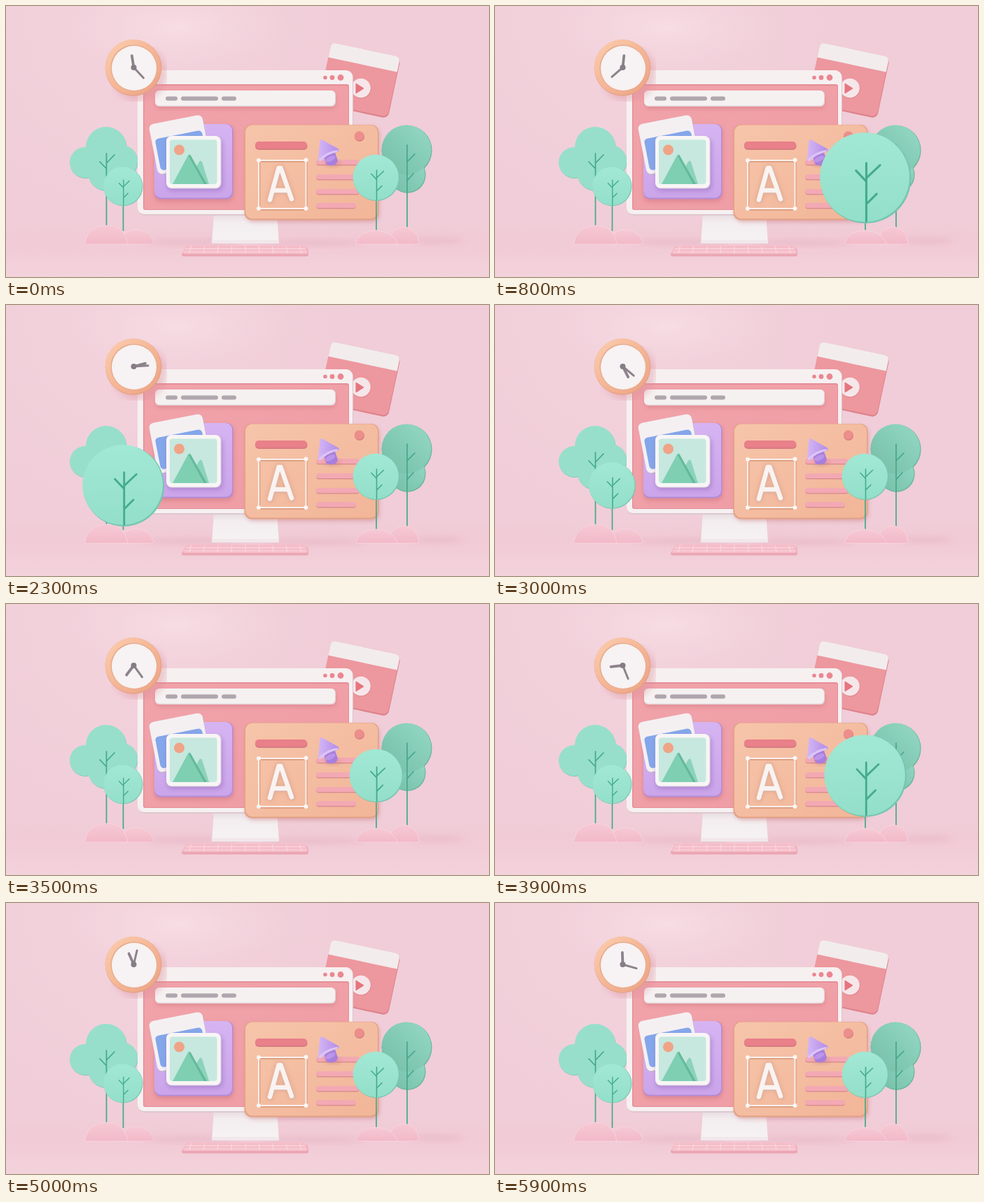
Animation of 690 by 388 pixels, one loop 6000 ms. Source, as an HTML page:

```html
<!DOCTYPE html>
<html lang="en">
<head>
<meta charset="utf-8">
<title>Design desk</title>
<style>
html, body { margin: 0; width: 100%; height: 100%; overflow: hidden; background: #f0cdd8; }
svg { display: block; width: 100vw; height: 100vh; }
</style>
</head>
<body>
<svg viewBox="0 0 690 388" xmlns="http://www.w3.org/2000/svg">
  <defs>
    <radialGradient id="glow" cx="190" cy="20" r="330" gradientUnits="userSpaceOnUse">
      <stop offset="0" stop-color="#f3d3dd"/><stop offset="1" stop-color="#f0cdd8"/>
    </radialGradient>
    <radialGradient id="spot">
      <stop offset="0" stop-color="#f7dde4"/><stop offset="1" stop-color="#f4d6df" stop-opacity="0"/>
    </radialGradient>
    <linearGradient id="floor" x1="0" y1="0" x2="0" y2="1">
      <stop offset="0" stop-color="#f0c9d5" stop-opacity="0"/><stop offset=".4" stop-color="#f1cbd6"/><stop offset="1" stop-color="#f3d2dc"/>
    </linearGradient>
    <linearGradient id="rim" x1="0" y1="0" x2="1" y2="1">
      <stop offset="0" stop-color="#fbceb0"/><stop offset=".5" stop-color="#f5b796"/><stop offset="1" stop-color="#eba184"/>
    </linearGradient>
    <linearGradient id="screen" x1="0" y1="0" x2="1" y2="1">
      <stop offset="0" stop-color="#f1a3aa"/><stop offset="1" stop-color="#ef9ca4"/>
    </linearGradient>
    <linearGradient id="peach" x1="0" y1="0" x2="1" y2="1">
      <stop offset="0" stop-color="#f6c5aa"/><stop offset="1" stop-color="#f2b598"/>
    </linearGradient>
    <linearGradient id="violet" x1="0" y1="0" x2="0" y2="1">
      <stop offset="0" stop-color="#d6b4f2"/><stop offset="1" stop-color="#cba5ea"/>
    </linearGradient>
    <linearGradient id="cone" x1="0" y1="0" x2="1" y2="0">
      <stop offset="0" stop-color="#d3b6f6"/><stop offset="1" stop-color="#b48ce6"/>
    </linearGradient>
    <linearGradient id="leaf" x1="0" y1="0" x2="0" y2="1">
      <stop offset="0" stop-color="#a2e8d5"/><stop offset="1" stop-color="#93dfca"/>
    </linearGradient>
    <linearGradient id="dusk" x1="1" y1="0" x2="0" y2="1">
      <stop offset="0" stop-color="#94d9c5"/><stop offset="1" stop-color="#74bda5"/>
    </linearGradient>
    <linearGradient id="mound" x1="0" y1="0" x2="0" y2="1">
      <stop offset="0" stop-color="#f6c9d5"/><stop offset="1" stop-color="#f2b9c8"/>
    </linearGradient>
    <linearGradient id="stand" x1="0" y1="0" x2="0" y2="1">
      <stop offset="0" stop-color="#e4d8dc"/><stop offset=".3" stop-color="#f3edef"/><stop offset="1" stop-color="#f6f2f3"/>
    </linearGradient>
    <filter id="soft" x="-30%" y="-30%" width="160%" height="160%"><feGaussianBlur stdDeviation="3"/></filter>
    <filter id="haze" x="-30%" y="-200%" width="160%" height="500%"><feGaussianBlur stdDeviation="5"/></filter>
    <g id="crown">
      <circle cx=".6" cy=".5" r="33" fill="#76c6b0"/>
      <circle cx="-.2" cy="-.2" r="32.600" fill="url(#leaf)"/>
      <path d="M1-10.500V32M1 .5L11-9M1 3L-6.500-5M1 19.500L8.500 12" fill="none" stroke="#45ab8e" stroke-linecap="round" stroke-width="1.600"/>
    </g>
  </defs>

  <rect width="690" height="388" fill="url(#glow)"/>
  <ellipse cx="245" cy="30" rx="160" ry="60" fill="url(#spot)"/>
  <rect y="310" width="690" height="78" fill="url(#floor)"/>
  <g fill="#e2aabb" opacity=".55" filter="url(#haze)">
    <ellipse cx="265" cy="338" rx="70" ry="3.500"/>
    <ellipse cx="440" cy="339" rx="75" ry="3.500"/>
    <ellipse cx="615" cy="336" rx="40" ry="3.500"/>
  </g>

  <!-- video card -->
  <g transform="translate(465 52) rotate(12)">
    <rect x=".5" y="1.500" width="101" height="88.500" rx="8" fill="#dd828b"/>
    <rect width="100.500" height="88" rx="8" fill="#ed979e"/>
    <path d="M0 22V8Q0 0 8 0H92.500Q100.500 0 100.500 8V22Z" fill="#f2eced"/>
  </g>
  <circle cx="507.500" cy="118.500" r="14" fill="#d97f87" opacity=".6"/>
  <circle cx="507" cy="117.500" r="13.800" fill="#f6e6e9"/>
  <path d="M500 111L511 118L500 125Z" fill="#e5757e" stroke="#e5757e" stroke-linejoin="round"/>

  <!-- back trees -->
  <g>
    <g fill="#7cc8b3" transform="translate(.6 1)">
      <circle cx="143" cy="202" r="29"/><circle cx="113" cy="224" r="22"/><circle cx="165" cy="222" r="23"/><circle cx="143" cy="238" r="26"/>
    </g>
    <g fill="#97dfcb">
      <circle cx="143" cy="202" r="29"/><circle cx="113" cy="224" r="22"/><circle cx="165" cy="222" r="23"/><circle cx="143" cy="238" r="26"/>
    </g>
    <path d="M143.500 211V318M143.500 225L155 213M143.500 233L134 223" fill="none" stroke="#45a88b" stroke-width="1.700" stroke-linecap="round"/>
  </g>
  <g>
    <g fill="#68b59e" transform="translate(.6 .8)"><circle cx="572" cy="206" r="36"/><circle cx="573" cy="241" r="26"/></g>
    <g fill="url(#dusk)"><circle cx="573" cy="241" r="25.500"/><circle cx="572" cy="206" r="35.500"/></g>
    <path d="M573 199V318M573 223L584 212M573 250L582 240" fill="none" stroke="#45a88b" stroke-width="1.700" stroke-linecap="round"/>
  </g>

  <!-- monitor -->
  <path d="M297 296H387L390 340H294Z" fill="url(#stand)"/>
  <path d="M294 335H390V340H294Z" fill="#f1e8eb"/>
  <rect x="189" y="93" width="307" height="207" rx="9" fill="#ddc8cf"/>
  <rect x="188" y="92" width="307" height="206" rx="9" fill="#f6f0f1"/>
  <rect x="196" y="112" width="294" height="180" rx="3" fill="#e58e97"/>
  <rect x="197.500" y="114" width="291.500" height="177" rx="3" fill="url(#screen)"/>
  <g fill="#ea8790">
    <circle cx="456" cy="102.500" r="2.800"/><circle cx="466" cy="102.500" r="3.400"/><circle cx="478" cy="102.500" r="4.400"/>
  </g>
  <rect x="214" y="125" width="257" height="22" rx="6" fill="#d67d85" opacity=".6" filter="url(#soft)"/>
  <rect x="213" y="121" width="258" height="23" rx="6" fill="#e4d6d9"/>
  <rect x="213" y="121" width="257" height="21.500" rx="6" fill="#f6f1f1"/>
  <g fill="#b0a6ad">
    <rect x="228" y="129.500" width="17" height="6" rx="3"/><rect x="250" y="129.500" width="53" height="6" rx="3"/><rect x="308" y="129.500" width="21" height="6" rx="3"/>
  </g>

  <!-- picture cards -->
  <rect x="212" y="172" width="113" height="108" rx="9" fill="#cf7580" opacity=".6" filter="url(#soft)"/>
  <rect x="212" y="169" width="112.500" height="107.500" rx="9" fill="#b48cd6"/>
  <rect x="212" y="169" width="111" height="105.500" rx="9" fill="url(#violet)"/>
  <g transform="translate(203.500 170) rotate(-11)">
    <rect x=".5" y="1.500" width="77.500" height="73" rx="7" fill="#c3b0cc"/>
    <rect width="77.500" height="73" rx="7" fill="#f4f0f2"/>
    <rect x="5" y="22" width="68" height="46" rx="5" fill="#84a6ea"/>
  </g>
  <rect x="230" y="190" width="80" height="75" rx="8" fill="#8d63b8" opacity=".45" filter="url(#soft)"/>
  <rect x="229" y="186" width="78.500" height="75.500" rx="8" fill="#ddd3de"/>
  <rect x="229" y="186" width="77.500" height="74.500" rx="8" fill="#f8f5f5"/>
  <rect x="234" y="191.500" width="67.500" height="63.500" rx="4" fill="#c6e8df"/>
  <circle cx="247.500" cy="206" r="7.500" fill="#f0a387"/>
  <path d="M258 255L276 223Q278 220 280 223L290 255Z" fill="#8cd3bb"/>
  <path d="M238 255L260 214Q262 211 264 214L286 255Z" fill="#7fcfb3"/>
  <path d="M263 213L287 255H283L261 215Z" fill="#65b99b"/>

  <!-- text card -->
  <rect x="343" y="174" width="190" height="135" rx="10" fill="#c8747b" opacity=".5" filter="url(#soft)"/>
  <rect x="340.500" y="170" width="192" height="136.500" rx="10" fill="#e3a284"/>
  <rect x="342" y="170.500" width="189" height="134" rx="10" fill="url(#peach)"/>
  <rect x="356" y="195" width="74.500" height="11" rx="5" fill="#d77a80"/>
  <rect x="356" y="194" width="74" height="10" rx="5" fill="#e9808a"/>
  <circle cx="505" cy="187" r="7" fill="#d67c7c"/>
  <circle cx="504.500" cy="186" r="6.700" fill="#ec8e8c"/>
  <g id="lines"></g>
  <rect x="362" y="222.500" width="67.500" height="69" fill="none" stroke="#dc9c7e" stroke-width="2.500"/>
  <rect x="361" y="221" width="67.500" height="69" fill="none" stroke="#f9efeb" stroke-width="2"/>
  <g fill="#fbf6f4"><circle cx="361" cy="221" r="3"/><circle cx="428.500" cy="220.500" r="3"/><circle cx="361" cy="290" r="3"/><circle cx="428.500" cy="290" r="3"/></g>
  <g fill="none" stroke-linecap="round" stroke-linejoin="round" stroke-width="6.500">
    <path d="M377 278L389.500 232H392.500L408.500 277M384 264H402" stroke="#d49c86" stroke-width="9" opacity=".6" filter="url(#soft)"/>
    <path d="M378 278.500L390.500 233H393.500L409 277.500M384 265.500H402" stroke="#dcb3a6"/>
    <path d="M377 277.500L389.500 232H392.500L408 276.500M383 264H401" stroke="#f9f3f1"/>
  </g>

  <!-- pointer -->
  <ellipse cx="467" cy="226" rx="12" ry="4" fill="#b87870" opacity=".4" filter="url(#soft)"/>
  <path d="M453 212L469 207L474 221Q473 228.500 464 228.500Q457 228 456 223Z" fill="#a97fdc"/>
  <path d="M448.500 193Q449.500 190 452.500 192L474 204Q478 207 473 209Q459 212 451 221Q446 224 446 219Z" fill="url(#cone)"/>
  <path d="M451 221Q459 212 473 209L475 206Q460 207 447 219Q447 224 451 221Z" fill="#dcc4f6"/>
  <ellipse cx="463" cy="219" rx="8" ry="3.500" transform="rotate(-25 463 219)" fill="#bb95e9"/>

  <!-- keyboard -->
  <path d="M257 345H427Q431 345 432 352V356Q432 358.500 429 358.500H254Q251 358.500 251 355Z" fill="#eba5b3"/>
  <path d="M259 343H425Q428 343 429 346L431 352Q432 355 428 355H255Q251 355 253 351L256 345Q257 343 259 343Z" fill="#f5bdc8"/>
  <g id="keys" stroke="#f9d8df" stroke-width="1.200"></g>

  <!-- clock -->
  <circle cx="190" cy="97" r="40" fill="#dc8f99" opacity=".4" filter="url(#haze)" clip-path="inset(0)"/>
  <circle cx="182" cy="88.500" r="40.300" fill="#e3a082"/>
  <circle cx="181.500" cy="87.800" r="39.800" fill="url(#rim)"/>
  <circle cx="182.500" cy="88.500" r="33" fill="#e5aa8c"/>
  <circle cx="183" cy="89" r="32" fill="#f7f2f3"/>
  <g stroke="#8d838b" stroke-linecap="round">
    <path id="minute" d="M0 0V-20.500" stroke-width="3"/>
    <path id="hour" d="M0 0V-17" stroke-width="3.800"/>
    <circle cx="182.500" cy="88" r="4" fill="#857c86" stroke="none"/>
  </g>

  <!-- front trees and mounds -->
  <path d="M167.500 270V322M529 270V323" stroke="#45a88b" stroke-width="1.700"/>
  <g fill="url(#mound)" stroke="#f9d6df" stroke-width=".8">
    <path d="M164 341Q165 321 186 320Q205 321 211 338Q211 341 208 341Z"/>
    <path d="M113 339Q117 315 146 314Q169 315 174 341H115Q112 341 113 339Z"/>
    <path d="M546 341Q549 317 570 316Q587 319 590 338Q590 341 587 341Z"/>
    <path d="M500 339Q505 322 529 321Q553 323 560 341H502Q499 341 500 339Z"/>
  </g>
  <use id="leftTree" href="#crown"/>
  <use id="rightTree" href="#crown"/>
</svg>
<script>
const LOOP = 6000, STEP = 100;
const $ = id => document.getElementById(id);

$('lines').innerHTML = [[220, 61], [241, 61], [262, 61], [282, 56]].map(([y, w]) =>
  `<rect x="443.500" y="${y + 1}" width="${w}" height="7.500" rx="3" fill="#dc8d93"/>` +
  `<rect x="443.500" y="${y}" width="${w}" height="7" rx="3" fill="#f3a9b3"/>`).join('');

let keys = '<path d="M257 347.500H427M255 352H429"/>';
for (let i = 0; i <= 8; i++) {
  const x = 262 + i * 20;
  keys += `<path d="M${x + (342 - x) * .03} 344L${x} 354"/>`;
}
$('keys').innerHTML = keys;

// [time, degrees clockwise from twelve]
const minutePath = [[0, 137], [800, 229], [1400, 358], [3000, 490], [3900, 518], [5000, 733], [5900, 826], [6000, 842]];
const hourPath = [[0, -9], [800, 6], [1400, 11], [3000, 153], [3900, 264], [5000, 336], [5900, 358], [6000, 359]];

// monotone cubic through the points
function follow(pts, t) {
  const n = pts.length - 1;
  const slope = i => (pts[i + 1][1] - pts[i][1]) / (pts[i + 1][0] - pts[i][0]);
  const tangent = i => {
    if (i === 0) return slope(0);
    if (i === n) return slope(n - 1);
    const a = slope(i - 1), b = slope(i);
    return 2 * a * b / (a + b);
  };
  let i = 0;
  while (i < n - 1 && t >= pts[i + 1][0]) i++;
  const [t0, a] = pts[i], [t1, b] = pts[i + 1];
  const h = t1 - t0, u = (t - t0) / h, v = 1 - u;
  return a * v * v * (1 + 2 * u) + b * u * u * (3 - 2 * u) +
    h * u * v * (tangent(i) * v - tangent(i + 1) * u);
}

const pulse = (t, mid, half) => Math.max(0, 1 - Math.abs(t - mid) / half);

function place(id, x, y, r) {
  $(id).setAttribute('transform', `translate(${x} ${y}) scale(${r / 33})`);
}

function turn(id, deg) {
  $(id).setAttribute('transform', `translate(182.500 88) rotate(${deg})`);
}

function draw(t) {
  turn('minute', follow(minutePath, t));
  turn('hour', follow(hourPath, t));
  place('leftTree', 167, 258, 28 + 30 * pulse(t, 2300, 850));
  place('rightTree', 528.5, 245.5, 33 + 37 * pulse(t, 700, 700) + 33 * pulse(t, 4050, 650));
}

const start = performance.now();
function tick() {
  const t = (performance.now() - start) % LOOP;
  draw(Math.floor(t / STEP) * STEP);
  requestAnimationFrame(tick);
}
tick();
</script>
</body>
</html>
```
